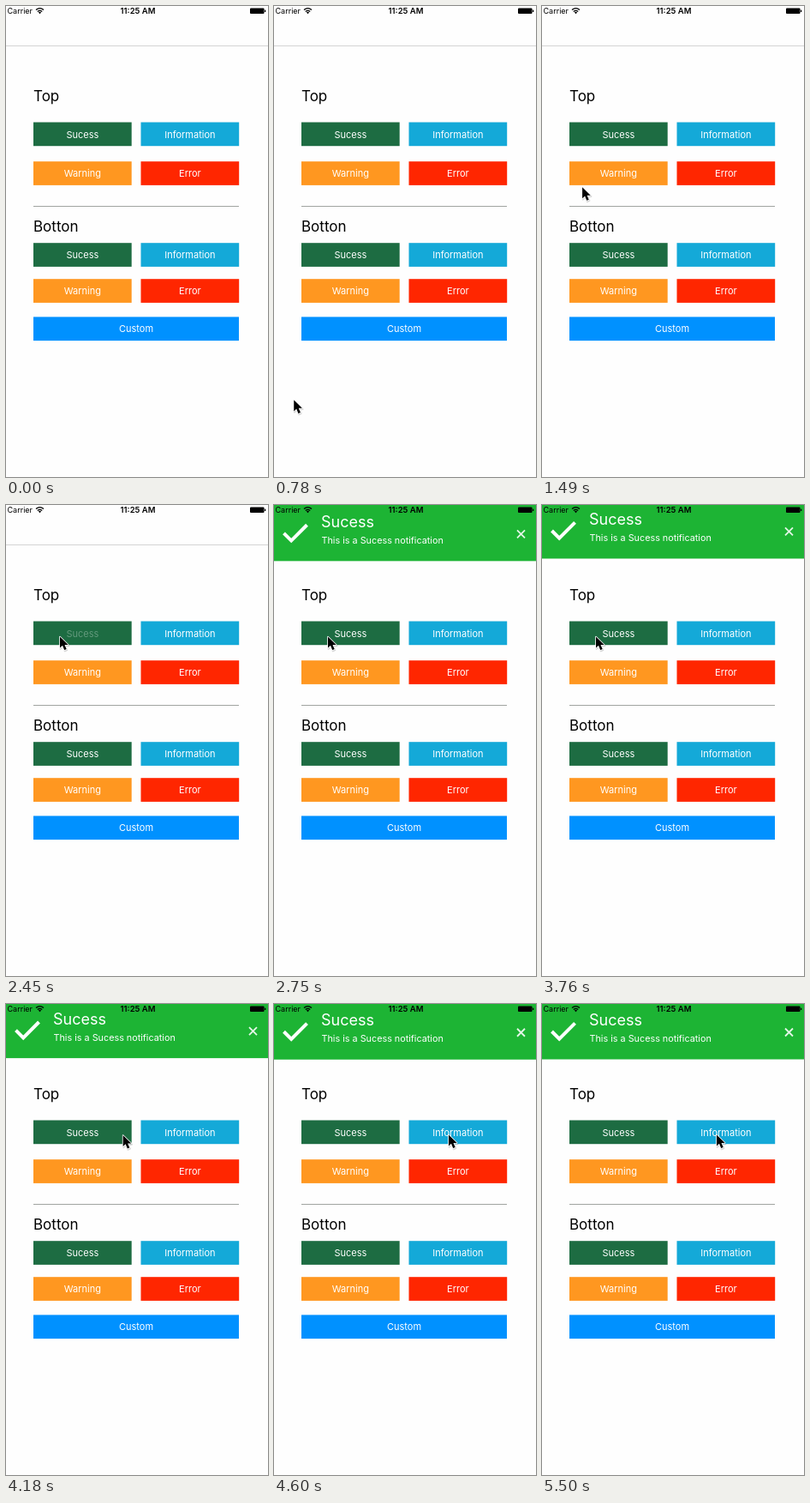
Write an HTML page that moves like this. It is 306 px wide and 549 px high and loops after 8 s.

```html
<!DOCTYPE html>
<html>
<head>
<meta charset="utf-8">
<style>
html, body { margin: 0; width: 100%; height: 100%; overflow: hidden; background: #fefefe; }
svg { display: block; width: 306px; height: 549px; font: 11px Inter, "Noto Sans", sans-serif; }
</style>
</head>
<body>
<svg viewBox="0 0 306 549">
  <path d="M0 46.5H306" stroke="#d4d4d4"/>
  <g font-size="17">
    <text x="32" y="111">Top</text>
    <text x="32" y="262.5">Botton</text>
  </g>
  <path d="M32 233.5H272" stroke="#a0a4a0"/>
  <g id="buttons" text-anchor="middle" fill="#fff"></g>

  <g id="banner" fill="#fff">
    <rect y="-100" width="306" height="164.5" fill="#1db434"/>
    <path d="M11.5 32L20.2 40.7L38.5 22.4" fill="none" stroke="#fff" stroke-width="4"/>
    <text x="55" y="25" font-size="18">Sucess</text>
    <text x="55.5" y="44" font-size="10.8">This is a Sucess notification</text>
    <path d="M284 28.5l9 9m0 -9l-9 9" stroke="#e4f6e7" stroke-width="1.8"/>
  </g>

  <g id="status">
    <text x="1.5" y="9" font-size="9">Carrier</text>
    <text x="154" y="9.2" font-size="9.5" font-weight="600" text-anchor="middle">11:25 AM</text>
    <g fill="none" stroke="#000" stroke-width="1.3">
      <path d="M35 4.6Q39.5 .7 44 4.6M36.8 6.5Q39.5 4.2 42.2 6.5"/>
    </g>
    <path d="M37.9 7.5Q39.5 6.2 41.1 7.5L39.5 9.2Z"/>
    <rect x="285" y="2.5" width="16.5" height="6.5" rx="1"/>
    <rect x="302" y="4.5" width="1.3" height="2.5" rx=".6"/>
  </g>

  <g id="cursor" stroke-linejoin="round">
    <path d="M1 2V14.6L4 11.8L6.2 17.1L8.7 16L6.5 11H10.7Z" transform="translate(.6 1.2)" fill="#000" stroke="#000" stroke-width="2" opacity=".15"/>
    <path d="M1 1.5V14.6L4 11.8L6.2 17.1L8.7 16L6.5 11H10.7Z" stroke="#fff" stroke-width="1.6" paint-order="stroke"/>
  </g>
</svg>
<script>
const LOOP = 8000, SHOW = 2450;
const $ = id => document.getElementById(id);

const kinds = [["Sucess", "#1d6c42"], ["Information", "#14a9d8"], ["Warning", "#ff9720"], ["Error", "#ff2600"]];
const button = ([label, color], x, y, w) =>
  `<rect x="${x}" y="${y}" width="${w}" height="27.7" fill="${color}"/>` +
  `<text x="${x + w / 2}" y="${y + 18}">${label}</text>`;
const grid = (y, gap) => kinds.map((k, i) => button(k, i % 2 ? 157.5 : 32, y + (i > 1 ? gap : 0), 114.7)).join("");
$("buttons").innerHTML = grid(135.5, 45.7) + grid(276.2, 42) + button(["Custom", "#0091ff"], 32, 362.4, 240);
const pressed = document.querySelector("#buttons text");

// Pointer stops: time, x, y
const stops = [
  [90, 77, 549], [450, 50, 500], [840, 21, 456], [980, 21, 456], [1200, 1, 365], [1490, 46, 210],
  [1790, 62, 160], [1970, 62, 152], [3800, 62, 152], [4540, 203, 151], [LOOP, 203, 151]
];

// Smooth interpolation without overshoot
function along(t, axis) {
  const slope = i => i < 0 || i > stops.length - 2 ? 0 :
    (stops[i + 1][axis] - stops[i][axis]) / (stops[i + 1][0] - stops[i][0]);
  const tangent = i => {
    const a = slope(i - 1), b = slope(i);
    return a * b > 0 ? 2 * a * b / (a + b) : 0;
  };
  const i = Math.max(0, stops.findIndex(s => s[0] > t) - 1);
  const [p, q] = [stops[i], stops[i + 1]];
  const d = q[0] - p[0], u = (t - p[0]) / d, v = 1 - u;
  return v * v * (1 + 2 * u) * p[axis] + u * u * (3 - 2 * u) * q[axis] +
    d * u * v * (v * tangent(i) - u * tangent(i + 1));
}

// Damped spring that first crosses its rest position at 2745 ms
function spring(t) {
  const s = (t - 2745) / 1000;
  return t < SHOW ? -200 : t > 5500 ? 0 : 39.4 * Math.exp(-2.25 * s) * Math.sin(3.61 * s);
}

const move = (id, x, y) => $(id).setAttribute("transform", `translate(${x} ${y})`);

function draw(now) {
  const t = now % LOOP;
  move("banner", 0, spring(t));
  const visible = t >= stops[0][0];
  $("cursor").style.display = visible ? "" : "none";
  if (visible) move("cursor", along(t, 1), along(t, 2));
  const fade = Math.min(1, Math.max(0, (t - SHOW) / 300));
  pressed.setAttribute("opacity", t < 2270 ? 1 : .3 + .7 * fade);
  requestAnimationFrame(draw);
}
draw(performance.now());
</script>
</body>
</html>
```
